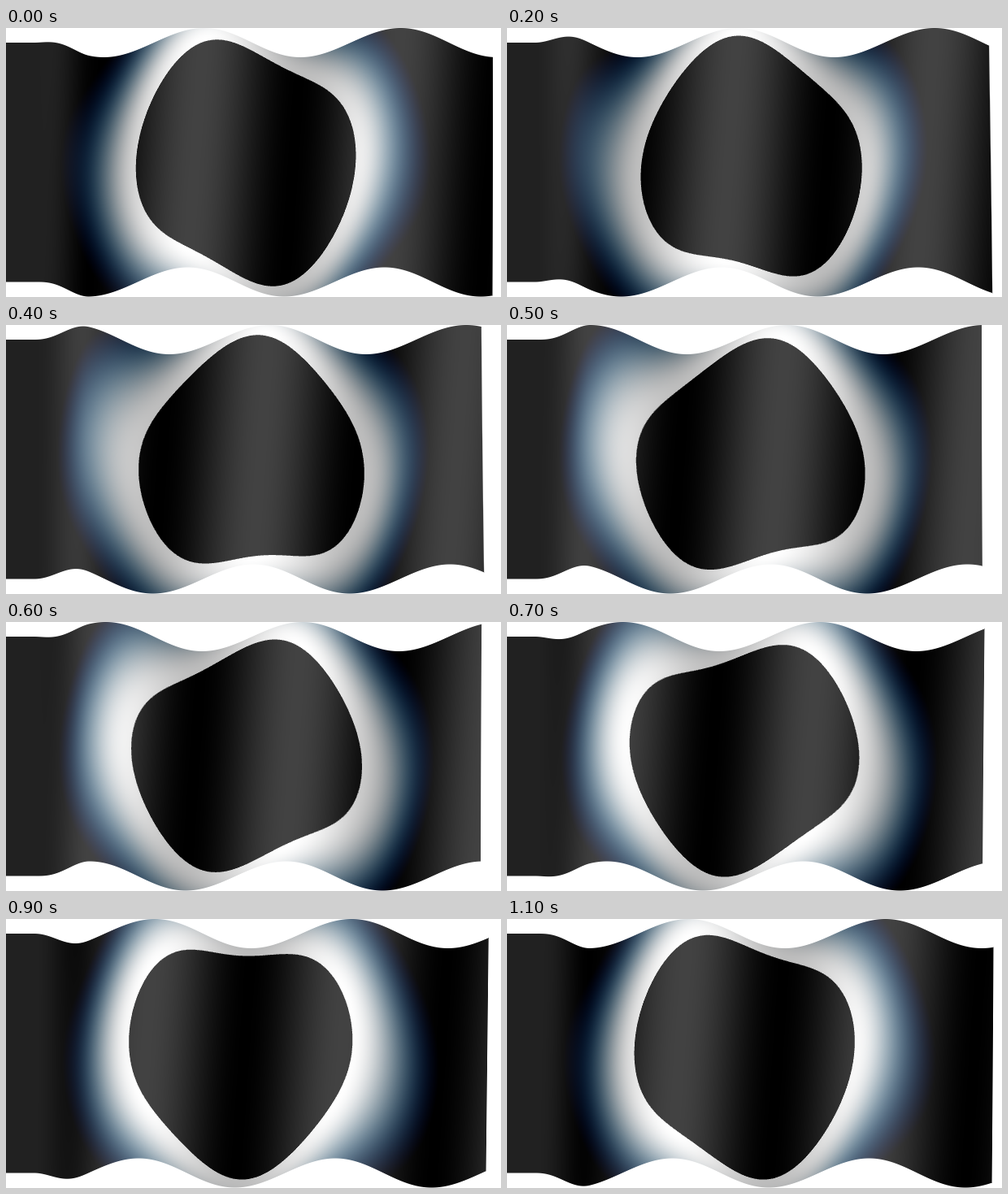
These frames come from a looping animation (609 px wide and 331 px high, 1.2 s). An HTML page with a canvas:

```html
<!DOCTYPE html>
<html lang="en">
<head>
<meta charset="utf-8">
<title>Waving eclipse flag</title>
<style>
  html, body { margin: 0; width: 100%; height: 100%; overflow: hidden; background: #fff; }
  canvas { display: block; }
</style>
</head>
<body>
<canvas id="stage" width="609" height="331"></canvas>
<script>
const W = 609, H = 331, STEPS = 12, STEP_MS = 100;
const flag = { right: 591.5, top: 17, bottom: 312.5 };
const disc = { x: 295, y: 165, radius: 138 };
const wave = { length: 242, crest: 242, slant: 20 / 294, dx: -7.5, dy: -18 };
const GLOW = 92;   // width of the corona
const SHADE = 66;  // strength of the light on the folds

const clamp = v => Math.min(1, Math.max(0, v));

// Corona: white at the disc, fading through blue to black
function colorAt(r) {
  const u = clamp((r - disc.radius) / GLOW);
  const fade = (1 + Math.cos(Math.PI * u)) / 2;
  const outside = clamp(r - disc.radius + 0.5);
  return [1 + 0.7 * u, 1, 1 - 0.4 * u].map(power => 255 * outside * fade ** power);
}

// The cloth is fixed at its left edge and swings freely further on
function looseness(x) {
  const u = clamp((x - 34) / 68);
  return u * u * (3 - 2 * u);
}

const FINE = 4; // palette entries per pixel of radius
const palette = Array.from({ length: 400 * FINE }, (_, i) => colorAt(i / FINE));
const ctx = document.getElementById("stage").getContext("2d");

function render(step) {
  const image = ctx.createImageData(W, H);
  for (let x = 0; x < W; x++) {
    const loose = looseness(x);
    for (let y = 0; y < H; y++) {
      const along = x - wave.crest + (y - flag.top) * wave.slant;
      const lift = loose * Math.cos(2 * Math.PI * (along / wave.length - step / STEPS));
      const sx = x - wave.dx * lift, sy = y - wave.dy * lift;
      const cover = clamp(Math.min(flag.right - sx, sy - flag.top, flag.bottom - sy));
      if (!cover) continue;

      const r = Math.hypot(sx - disc.x, sy - disc.y);
      const color = palette[Math.round(r * FINE)];
      const light = SHADE * (1 + lift) / 2;
      const p = (y * W + x) * 4;
      for (let c = 0; c < 3; c++) {
        image.data[p + c] = color[c] * (1 - SHADE / 255) + light;
      }
      image.data[p + 3] = 255 * cover;
    }
  }
  return image;
}

const images = [];
let shown = -1;

function draw() {
  const step = Math.floor(performance.now() / STEP_MS) % STEPS;
  if (step !== shown) {
    images[step] ||= render(step);
    ctx.putImageData(images[step], 0, 0);
    shown = step;
  }
  requestAnimationFrame(draw);
}
draw();
</script>
</body>
</html>
```
